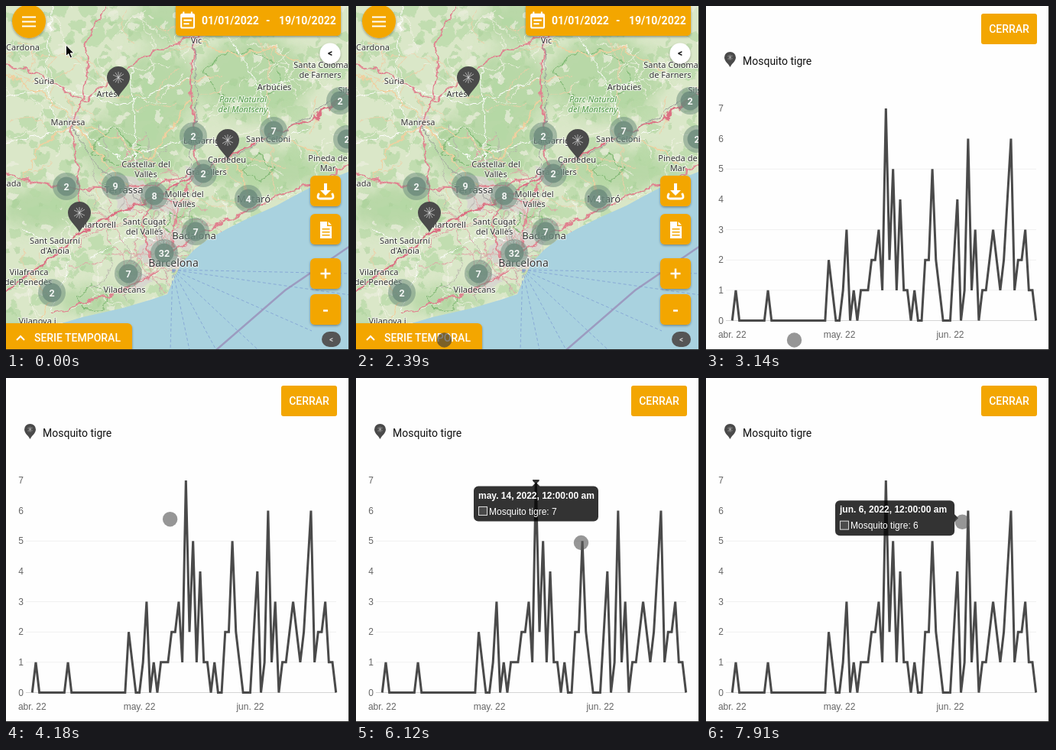
An HTML page for the animation above (8 s loop, 450 by 450 pixels).

```html
<!DOCTYPE html>
<html lang="es">
<head>
<meta charset="utf-8">
<style>
html, body { margin: 0; width: 100%; height: 100%; overflow: hidden; }
svg { display: block; width: 100%; height: 100%; }
.ui { font: 500 14px Roboto, sans-serif; fill: #fff; }
.axis { font: 12px "Liberation Sans", Arial, sans-serif; fill: #666; }
.place { font-family: "Noto Sans", sans-serif; fill: #333; text-anchor: middle;
  paint-order: stroke; stroke: #fff; stroke-opacity: .65; stroke-width: 2.2px; stroke-linejoin: round; }
.count { font: 700 12.5px Roboto, sans-serif; fill: #f4f6f5; text-anchor: middle; }
#tip { font: 12px "Liberation Sans", Arial, sans-serif; fill: #fff; }
.mid { text-anchor: middle; }
</style>
</head>
<body>
<svg viewBox="0 0 450 450">
  <defs>
    <filter id="soft"><feGaussianBlur stdDeviation="9"/></filter>
    <filter id="rough" filterUnits="userSpaceOnUse" x="0" y="0" width="450" height="450">
      <feTurbulence type="fractalNoise" baseFrequency=".07" numOctaves="3" seed="4"/>
      <feDisplacementMap in="SourceGraphic" scale="13" xChannelSelector="R" yChannelSelector="G"/>
    </filter>
    <filter id="shade" x="-20%" y="-20%" width="140%" height="150%">
      <feDropShadow dx="0" dy="1.5" stdDeviation="1.5" flood-opacity=".35"/>
    </filter>
    <g id="pin">
      <path d="M0 40C-4 31-15 25-15 14.500A15 14.500 0 0 1 15 14.500C15 25 4 31 0 40Z" fill="#4a4a4a"/>
      <path d="M0 7V22M-7 11L7 18M7 10L-7 19M-4 8L4 21M4 8L-4 21" stroke="#d8d8d8" stroke-width=".7"/>
    </g>
  </defs>
  <rect width="450" height="450" fill="#dae7c8"/>
  <g id="map"></g>
  <g id="markers"></g>

  <g id="controls" class="ui">
    <g fill="#f3a602" filter="url(#shade)">
      <circle cx="30" cy="20" r="22"/>
      <path d="M222 0H438V34a5 5 0 0 1-5 5H227a5 5 0 0 1-5-5Z"/>
      <rect x="398" y="222" width="40" height="40" rx="6"/>
      <rect x="398" y="272" width="40" height="40" rx="6"/>
      <rect x="398" y="330" width="40" height="40" rx="6"/>
      <rect x="398" y="377" width="40" height="40" rx="6"/>
      <path d="M0 415H159a6 6 0 0 1 6 6V450H0Z"/>
      <circle cx="424" cy="62" r="13.500" fill="#fff"/>
    </g>
    <rect x="413" y="426" width="25" height="20" rx="10" fill="#555"/>
    <path d="M21 14.500H39M21 20.500H39M21 26.500H39" stroke="#fff" stroke-width="2"/>
    <path transform="translate(225 6.500) scale(1.05)" fill-rule="evenodd" d="M19 3h-1V1h-2v2H8V1H6v2H5c-1 0-2 1-2 2v15c0 1 1 2 2 2h14c1 0 2-1 2-2V5c0-1-1-2-2-2zm0 17H5V8h14zM7 10.500h10v2H7zM7 15h7v2H7z"/>
    <g font-weight="700">
      <text x="256" y="24">01/01/2022</text><text x="340" y="24">-</text><text x="357" y="24">19/10/2022</text>
    </g>
    <path d="M416 232h4v9h5l-7 7-7-7h5z"/>
    <path d="M409 246c-2 4-1 6 2 6H425c3 0 4-2 2-6" fill="none" stroke="#fff" stroke-width="3" stroke-linecap="round"/>
    <path fill-rule="evenodd" d="M411 282h9v6h6v16h-15zM421.500 282l4.500 4.500h-4.500zM413.500 291h10v1.500h-10zM413.500 295h10v1.500h-10zM413.500 299h10v1.500h-10z"/>
    <path d="M411.500 350H424.500M418 343.500V356.500M415 398.500H421" stroke="#fff" stroke-width="2.500"/>
    <text x="424" y="66" class="mid" style="font-size:12px;font-weight:700;fill:#111">&lt;</text>
    <text x="425.500" y="440" class="mid" style="font-size:10px;fill:#ddd">&lt;</text>
    <path d="M14 437l5-5 5 5" fill="none" stroke="#fff" stroke-width="2"/>
    <text x="37" y="439">SERIE TEMPORAL</text>
  </g>

  <g id="panel">
    <rect y="-11" width="450" height="475" fill="#fefefe" style="filter:drop-shadow(0 -2px 3px #0006)"/>
    <rect id="scroll" x="441" y="-6" width="3" height="119" fill="#d4d4d4"/>
    <rect x="360" y="10" width="73" height="40" rx="3" fill="#f3a602"/>
    <text class="ui mid" x="396.500" y="35">CERRAR</text>
    <use href="#pin" transform="translate(31.500 60) scale(.5)"/>
    <text x="48" y="77" class="ui" style="font-weight:400;fill:#111">Mosquito tigre</text>
    <g id="chart"></g>
    <path id="dot" d="M231 133H239.800A4.400 4.400 0 0 1 231 133Z" fill="#333"/>
  </g>
  <g id="tip">
    <path id="box" fill="#000" fill-opacity=".8"/>
    <text id="title" x="6" y="16" font-weight="700"></text>
    <rect x="6.500" y="27" width="11" height="11" fill="#4a4a4a" stroke="#ddd"/>
    <text id="body" x="20" y="37"></text>
  </g>
  <circle id="touch" r="9.700"/>
  <path id="arrow" d="M0 0V14.500L3.300 11.500 5.700 17 8 16 5.700 10.700H10.300Z" stroke="#fff" stroke-width=".9"/>
  <path d="M448 0H450V450H0V449H448Z" fill="#262626"/>
</svg>
<script>
const $ = id => document.getElementById(id);
const clamp = v => Math.max(0, Math.min(1, v));
const smooth = v => (v = clamp(v), v * v * (3 - 2 * v));
const mix = (a, b, p) => a + (b - a) * p;

let seed = 7;
const rnd = () => (seed = seed * 16807 % 2147483647) / 2147483647;

// Map
function blob(x, y, r) {
  let d = '';
  for (let i = 0; i < 9; i++) {
    const a = i * Math.PI * 2 / 9, q = r * (.5 + rnd() * .7);
    d += (i ? 'L' : 'M') + (x + Math.cos(a) * q * 1.2).toFixed(1) + ' ' + (y + Math.sin(a) * q).toFixed(1);
  }
  return d + 'Z';
}
function blobs(n, r, fill, alpha) {
  let d = '';
  for (let i = 0; i < n; i++) d += blob(rnd() * 450, rnd() * 420, r * (.4 + rnd()));
  return `<path d="${d}" fill="${fill}" opacity="${alpha}"/>`;
}
const road = (color, width, d) =>
  `<path d="${d}" fill="none" stroke="${color}" stroke-width="${width}" stroke-linejoin="round"/>`;
// Wandering lanes that start inside a box
function lanes(n, x0, y0, w, h, color, width) {
  let d = '';
  for (let i = 0; i < n; i++) {
    let a = rnd() * 6.3;
    d += `M${(x0 + rnd() * w).toFixed(1)} ${(y0 + rnd() * h).toFixed(1)}`;
    for (let j = 0; j < 6; j++) {
      a += (rnd() - .5) * 1.2;
      d += `l${(Math.cos(a) * 9).toFixed(1)} ${(Math.sin(a) * 9).toFixed(1)}`;
    }
  }
  return road(color, width, d);
}
const wood = [[325, 95, 75, 55], [165, 185, 65, 50], [340, 215, 75, 28], [115, 385, 50, 18],
  [200, 110, 55, 50], [50, 265, 55, 30], [205, 20, 40, 30], [235, 275, 20, 20]]
  .map(([x, y, w, h]) => `<ellipse cx="${x}" cy="${y}" rx="${w}" ry="${h}"/>`).join('');
const town = [[205, 322, 30], [232, 303, 16], [160, 243, 22], [195, 250, 17], [250, 218, 14],
  [85, 153, 10], [248, 38, 12], [318, 255, 9], [170, 360, 15], [215, 265, 14]]
  .map(([x, y, r]) => blob(x, y, r)).join('');
const parks = [[310, 105, 42], [135, 185, 30], [330, 212, 18], [225, 285, 16], [110, 385, 20]]
  .map(([x, y, r]) => blob(x, y, r)).join('');

let ferry = '';
for (const [x, y] of [[215, 450], [240, 450], [275, 450], [330, 450], [400, 425], [450, 378], [450, 350]])
  ferry += `M218 345L${x} ${y}`;

$('map').innerHTML =
  '<g filter="url(#rough)">' +
  `<g fill="#add39c" opacity=".75" filter="url(#soft)">${wood}</g>` +
  blobs(300, 9, '#b4d8a4', .65) + blobs(170, 5, '#eceedd', .7) + blobs(220, 4, '#a8cf97', .5) +
  `<path d="${town}" fill="#d9d5d1" opacity=".85"/>` +
  `<path d="${parks}" fill="none" stroke="#7fb873" stroke-width="1.200"/>` +
  lanes(90, 0, 0, 450, 400, '#f7f5ea', .8) + lanes(50, 0, 0, 450, 400, '#efcfa8', .9) +
  lanes(45, 130, 205, 120, 145, '#e0a3a6', 1) + lanes(25, 130, 205, 120, 145, '#b5aeab', .8) +
  road('#fff', 1, 'M0 120L60 105L150 130L240 95M60 0L50 100L70 160M20 290L85 325L60 400M165 80L170 210M330 105L355 170L395 160M0 180L90 160L150 200L240 175M280 20L330 105L410 90M110 330L160 300L210 310') +
  road('#f1cf9f', 1.5, 'M0 90L45 112L85 150L150 175L200 210M245 45L300 65L350 55L410 90M90 155L45 180L25 225M185 205L215 160L243 120M85 150L130 205L160 240M30 350L60 385L40 415M290 190L310 225L318 252M350 165L400 190L425 212') +
  road('#e08390', 2, 'M132 0L118 20L103 54L107 85L100 120L86 158L93 202L95 250L105 285M100 125L132 100L180 66L232 44L270 30L335 10M247 42L241 100L247 165L250 215L224 262L217 318M0 218L42 232L80 238L145 241L200 232L255 215M0 76L40 88L100 125M60 402L118 383L160 368L200 348M214 325L250 299L320 265L400 232L450 206M190 340L178 285L194 249L235 260') +
  road('#dc6f82', 2.3, 'M0 374L50 336L96 298L148 268L196 250L255 216L300 193L350 166L405 146L450 112') +
  road('#999', 1, 'M85 152L115 205L165 246L198 285L213 330M245 40L250 120L240 210L210 260M250 216L300 196L350 169L405 140L450 105') +
  '</g>' +
  '<path d="M450 216L425 226L397 238L374 250L354 261L318 277L290 291L263 306L246 319L230 336L221 354L211 377L190 384L153 395L100 407L60 419L0 441V450H450Z" fill="#a9d2df"/>' +
  `<path d="${ferry}" fill="none" stroke="#7f9fd3" stroke-width=".8" stroke-dasharray="4 3"/>` +
  '<path d="M275 450L365 372L450 314" fill="none" stroke="#9b92bb" stroke-width="2.500" opacity=".85"/>' +
  '<g transform="translate(0 .5)">' +
  [['Cardona', 22, 57], ['Súria', 50, 101], ['Manresa', 81, 155], ['Artés', 132, 118], ['Vic', 249, 48],
   ['Arbúcies', 351, 109], ['Santa Coloma', 412, 80], ['de Farners', 411, 93], ['Sils', 443, 113],
   ['Sant Celoni', 343, 177], ['Cardedeu', 289, 204], ['La Garriga', 259, 179], ['Granollers', 262, 220],
   ['Castellar del', 183, 210], ['Vallès', 183, 223], ['Terrassa', 154, 244, 13], ['Mollet del', 233, 249],
   ['Vallès', 233, 262], ['Mataró', 324, 256, 13], ['Pineda de', 421, 202], ['Mar', 421, 215],
   ['Sant Cugat', 181, 285], ['del Vallès', 181, 298], ['Badalona', 246, 304, 13], ['Barcelona', 219, 340, 14],
   ['Martorell', 120, 289], ['Sant Sadurní', 64, 310], ["d'Anoia", 64, 323], ['Vilafranca', 30, 351],
   ['del Penedès', 29, 364], ['Viladecans', 155, 374], ['Vilanova i', 41, 415], ['Igualada', -3, 235]]
  .map(([s, x, y, size = 11]) => `<text class="place" x="${x}" y="${y}" font-size="${size}">${s}</text>`).join('') +
  '<g class="place" style="fill:#4f9a45;font-style:italic" font-size="11"><text x="310" y="125">Parc Natural</text><text x="310" y="138">del Montseny</text></g></g>';

$('markers').innerHTML =
  [[437, 124, 2], [350, 163, 7], [245, 170, 2], [258, 219, 2], [79, 236, 2], [143, 235, 9], [194, 248, 8],
   [317, 252, 4], [248, 295, 7], [207, 323, 32], [160, 350, 7], [60, 375, 2], [446, 174, 2]]
  .map(([x, y, n]) => `<g transform="translate(${x} ${y})"><circle r="18" fill="#6b8a7c" opacity=".5"/>` +
    `<circle r="12.500" fill="#6b8a7c" opacity=".8"/><text class="count" y="4.500">${n}</text></g>`).join('') +
  [[147, 79], [290, 161], [96, 256]].map(([x, y]) => `<use href="#pin" x="${x}" y="${y}"/>`).join('');

// Chart: one digit per day
const days = '01' + '0'.repeat(8) + '1' + '0'.repeat(16) +
  '21001301011122317251411010022521000240161301123212461223110';
const px = i => 34.300 + i * 4.675, py = v => 411.500 - v * 39.640;
let chart = '';
for (let v = 0; v < 8; v++) {
  if ([1, 2, 3, 5].includes(v)) chart += `<path d="M26 ${py(v)}H432" stroke="#f0f0f0"/>`;
  chart += `<text class="axis" x="23" y="${py(v) + 4}" text-anchor="end">${v}</text>`;
}
chart += '<path d="M26 411.500H432" stroke="#d5d5d5"/>';
[['abr. 22', 0], ['may. 22', 30], ['jun. 22', 61]].forEach(([s, i]) =>
  chart += `<text class="axis mid" x="${px(i)}" y="434">${s}</text>`);
chart += `<polyline points="${[...days].map((v, i) => px(i) + ',' + py(v)).join(' ')}" fill="none" stroke="#4a4a4a" stroke-width="3"/>`;
$('chart').innerHTML = chart;

// Tooltip stops: start time, title, value, from and to as [x, y, width]
const tips = [
  [4766, 'may. 14', 7, [124, 210, 163], [154, 141.500, 163]],
  [6565, 'may. 27', 5, [154, 141.500, 163], [126, 190.500, 163]],
  [7792, 'jun. 6', 6, [126, 190.500, 163], [182, 151, 154]]
];
function drawTip(t) {
  const tip = tips.filter(s => t >= s[0]).pop();
  $('tip').style.display = tip ? '' : 'none';
  if (!tip) return;
  const [start, day, value, from, to] = tip;
  const p = 1 - (1 - clamp((t - start) / 400)) ** 4;
  const [x, y, w] = from.map((a, i) => mix(a, to[i], p));
  $('tip').setAttribute('transform', `translate(${x} ${y})`);
  $('tip').setAttribute('opacity', clamp((t - tips[0][0]) / 190));
  const top = value === 7 ? `H${w / 2 - 5}l5 -5l5 5` : '';
  const side = value === 7 ? '' : 'V18l5 5l-5 5';
  $('box').setAttribute('d', `M6 0${top}H${w - 6}a6 6 0 0 1 6 6${side}V40a6 6 0 0 1-6 6H6a6 6 0 0 1-6-6V6a6 6 0 0 1 6-6Z`);
  $('title').textContent = day + ', 2022, 12:00:00 am';
  $('body').textContent = 'Mosquito tigre: ' + value;
}

// Pointer legs: first step, last step, x, y
const legs = [[22, 30, 233, 138], [34, 38, 294.500, 219], [40, 41, 294.500, 215.500], [46, 49, 333.500, 189], [49, 50, 335.300, 188.300]];
function touchAt(k) {
  let x = 115.500, y = 437;
  for (const [a, b, tx, ty] of legs) {
    const p = smooth((k - a) / (b - a));
    x = mix(x, tx, p);
    y = mix(y, ty, p);
  }
  return [x, y];
}
const show = (id, on) => $(id).style.display = on ? '' : 'none';
const STEP = 149.330;

function draw(t) {
  const k = Math.floor((t + 8) / STEP);

  show('arrow', k < 6 || k === 10);
  const p = smooth((k - 1) / 4);
  $('arrow').setAttribute('transform', k === 10 ? 'translate(114 440)' : `translate(${mix(78.500, 138, p)} ${mix(51, 328, p)})`);

  show('panel', k > 16);
  show('scroll', k < 21);
  $('panel').setAttribute('transform', `translate(0 ${461 * (1 - smooth((k - 15.950) / 4))})`);
  show('dot', k > 32 && k < 44);
  drawTip(k * STEP);

  show('touch', k > 14);
  const [x, y] = touchAt(k);
  $('touch').setAttribute('cx', x);
  $('touch').setAttribute('cy', y);
  $('touch').setAttribute('fill', [16, 31, 43, 51, 52].includes(k) ? 'rgba(60,60,60,.65)' : 'rgba(85,85,85,.62)');
}
const begin = performance.now();
function frame() {
  draw((performance.now() - begin) % 8000);
  requestAnimationFrame(frame);
}
frame();
</script>
</body>
</html>
```
